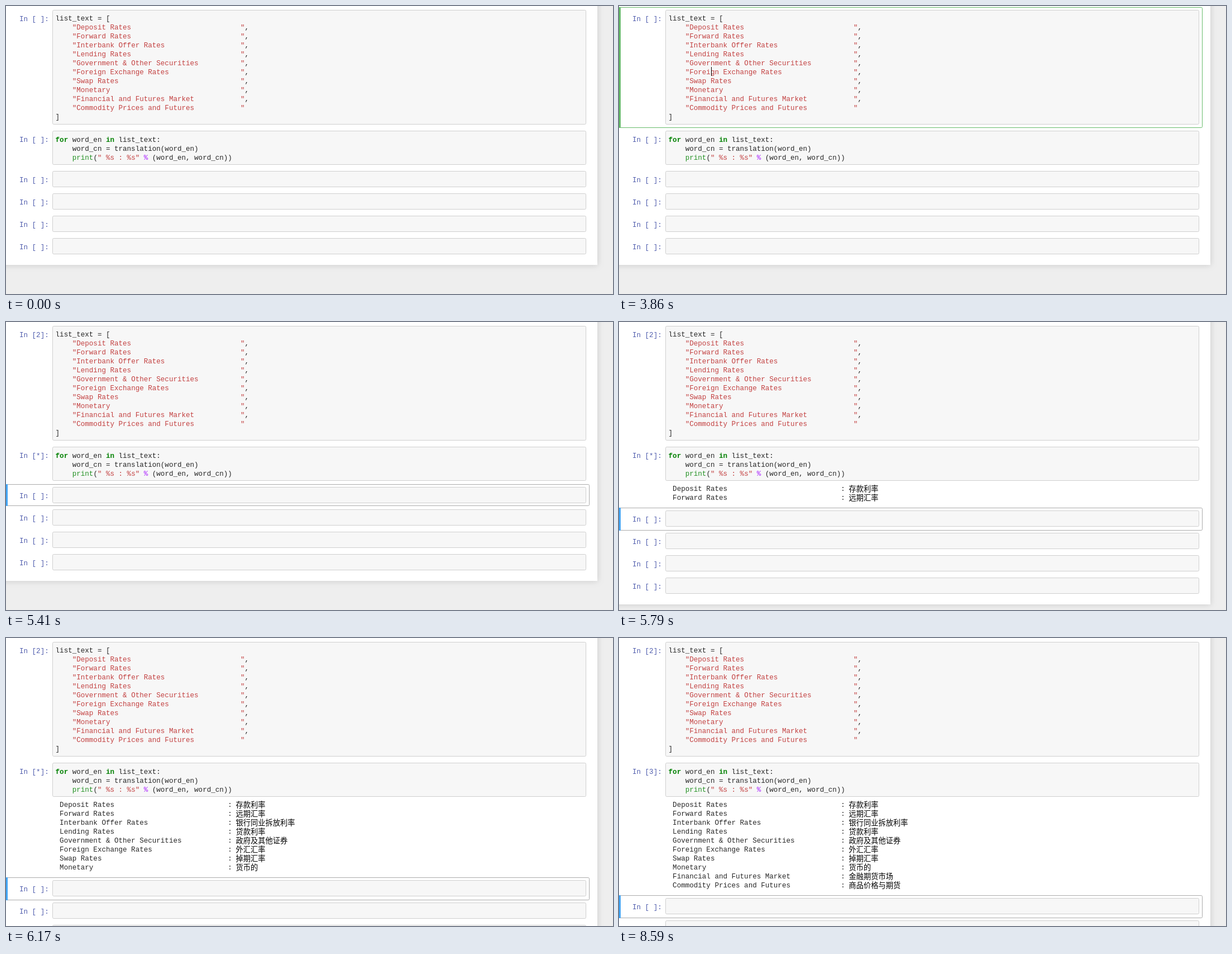
Write an HTML page that moves like this. It is 1087 px wide and 515 px high and loops after 9670 ms.

```html
<!DOCTYPE html>
<html lang="en">
<head>
<meta charset="utf-8">
<title>Notebook</title>
<style>
  html, body { margin: 0; width: 100%; height: 100%; overflow: hidden; background: #eee; }
  svg { display: block; width: 100%; height: 100%; }
  text { font: 12.55px "Liberation Mono", monospace; white-space: pre; fill: #000; fill-opacity: .85; }
  .cjk { font: 13.25px "Noto Sans CJK SC", "Noto Sans CJK", sans-serif; fill-opacity: 1; }
  .prompt { fill: #303f9f; }
  .str { fill: #ba2121; }
  .key { fill: #008000; font-weight: bold; fill-opacity: 1; }
  .fn { fill: #008000; }
  .op { fill: #a2f; font-weight: bold; }
  .box { fill: #f7f7f7; stroke: #cfcfcf; }
  .page { fill: #fff; filter: drop-shadow(0 0 5.5px rgba(87, 87, 87, .25)); }
</style>
</head>
<body>
<svg id="stage" viewBox="0 0 1087 515"></svg>
<script>
const LOOP = 9670, LINE = 16, CODE_X = 88.6;
const stage = document.getElementById('stage');

const words = [
  ['Deposit Rates', '存款利率'],
  ['Forward Rates', '远期汇率'],
  ['Interbank Offer Rates', '银行同业拆放利率'],
  ['Lending Rates', '贷款利率'],
  ['Government & Other Securities', '政府及其他证券'],
  ['Foreign Exchange Rates', '外汇汇率'],
  ['Swap Rates', '掉期汇率'],
  ['Monetary', '货币的'],
  ['Financial and Futures Market', '金融期货市场'],
  ['Commodity Prices and Futures', '商品价格与期货']
];

// Each track lists [start ms, value]; a value holds until the next start.
const selection = [[0, ''], [2850, 'edit'], [4420, 'second'], [5410, 'third']];
const firstPrompt = [[0, ' '], [4420, '*'], [4570, '2']];
const secondPrompt = [[0, ' '], [5410, '*'], [6350, '3']];
const outputCount = [[0, 0], [5790, 2], [5940, 5], [6170, 8], [6260, 10]];
const caretOn = [[0, false], [2850, true], [3310, false], [3860, true], [4420, false]];
const pointerAt = [
  [0, null],
  [2250, [213, 148]], [2300, [207, 165]], [2380, [195, 177]], [2460, [183, 168]],
  [2540, [174, 148]], [2620, [168, 130]], [2700, [166, 123]],
  [3000, [166, 120]], [3080, null],
  [8280, [949, 272]], [8360, [963, 332]], [8440, [980, 410]], [8510, [994, 491]],
  [8590, null]
];

const valueAt = (track, t) => track.filter(([start]) => start <= t).pop()[1];

function set(node, attrs) {
  for (const name in attrs) node.setAttribute(name, attrs[name]);
  return node;
}

function add(parent, tag, attrs, content = '') {
  const node = document.createElementNS('http://www.w3.org/2000/svg', tag);
  node.textContent = content;
  return parent.appendChild(set(node, attrs));
}

function show(node, visible) {
  node.style.display = visible ? '' : 'none';
}

// Parts alternate between plain strings and [class, string] pairs.
function codeLine(y, ...parts) {
  const line = add(stage, 'text', { x: CODE_X, y });
  for (const part of parts) {
    const [name, content] = Array.isArray(part) ? part : ['', part];
    add(line, 'tspan', { class: name }, content);
  }
  return line;
}

function cell(parent, top, lines) {
  const height = 13 + LINE * lines;
  add(parent, 'rect', { class: 'box', x: 83.5, y: top + .5, width: 955, height: height - 1, rx: 2 });
  return add(parent, 'text', { class: 'prompt', x: 24, y: top + 20 }, 'In [ ]:');
}

const page = add(stage, 'rect', { class: 'page', x: -40, y: -40, width: 1099 });
const frame = add(stage, 'rect', { x: -2.5, width: 1047, rx: 2, fill: 'none' });
const bar = add(stage, 'rect', { x: 0, width: 3 });

const first = cell(stage, 7, 12);
codeLine(26, 'list_text = [');
words.forEach(([english], i) => {
  const comma = i < words.length - 1 ? ',' : '';
  codeLine(42 + LINE * i, '    ', ['str', `"${english.padEnd(39)}"`], comma);
});
codeLine(202, ']');

const second = cell(stage, 223, 3);
codeLine(243, ['key', 'for'], ' word_en ', ['key', 'in'], ' list_text:');
codeLine(259, '    word_cn = translation(word_en)');
codeLine(275, '    ', ['fn', 'print'], '(', ['str', '" %s : %s"'], ' ', ['op', '%'], ' (word_en, word_cn))');

const output = words.map(([english, chinese], i) => {
  const row = add(stage, 'g', {});
  const y = 302 + LINE * i;
  row.append(codeLine(y, ` ${english.padEnd(39)} : `));
  add(row, 'text', { class: 'cjk', x: 411.5, y: y + .5 }, chinese);
  return row;
});

const emptyCells = add(stage, 'g', {});
for (let i = 0; i < 4; i++) cell(emptyCells, 40 * i, 1);

const caret = add(stage, 'rect', { x: 165, y: 109, width: 1, height: 16 });
const pointer = add(stage, 'path', {
  d: 'M-3 -7.5H-1Q.5 -7.5 .5 -6Q.5 -7.5 2 -7.5H4M.5 -6.5V6.5M-3 7.5H-1Q.5 7.5 .5 6Q.5 7.5 2 7.5H4',
  fill: 'none', stroke: '#000'
});

function drawSelection(kind, top, hasOutput) {
  show(frame, kind);
  show(bar, kind);
  if (!kind) return;
  const [y, height] = {
    edit: [2, 215],
    second: [218, 71],
    third: [top - 5, hasOutput ? 40 : 38]
  }[kind];
  const editing = kind === 'edit';
  set(frame, { y: y + .5, height, stroke: editing ? '#66bb6a' : '#ababab' });
  set(bar, { y, height: height + 1, fill: editing ? '#66bb6a' : '#42a5f5' });
}

function draw(t) {
  const count = valueAt(outputCount, t);
  const top = count ? 305 + LINE * count : 295;
  set(page, { height: top + 168 + 40 });
  set(emptyCells, { transform: `translate(0 ${top})` });
  drawSelection(valueAt(selection, t), top, count > 0);
  first.textContent = `In [${valueAt(firstPrompt, t)}]:`;
  second.textContent = `In [${valueAt(secondPrompt, t)}]:`;
  output.forEach((row, i) => show(row, i < count));
  show(caret, valueAt(caretOn, t));
  const spot = valueAt(pointerAt, t);
  show(pointer, spot);
  if (spot) set(pointer, { transform: `translate(${spot})` });
}

const begin = performance.now();
function tick() {
  draw((performance.now() - begin) % LOOP);
  requestAnimationFrame(tick);
}
tick();
</script>
</body>
</html>
```
